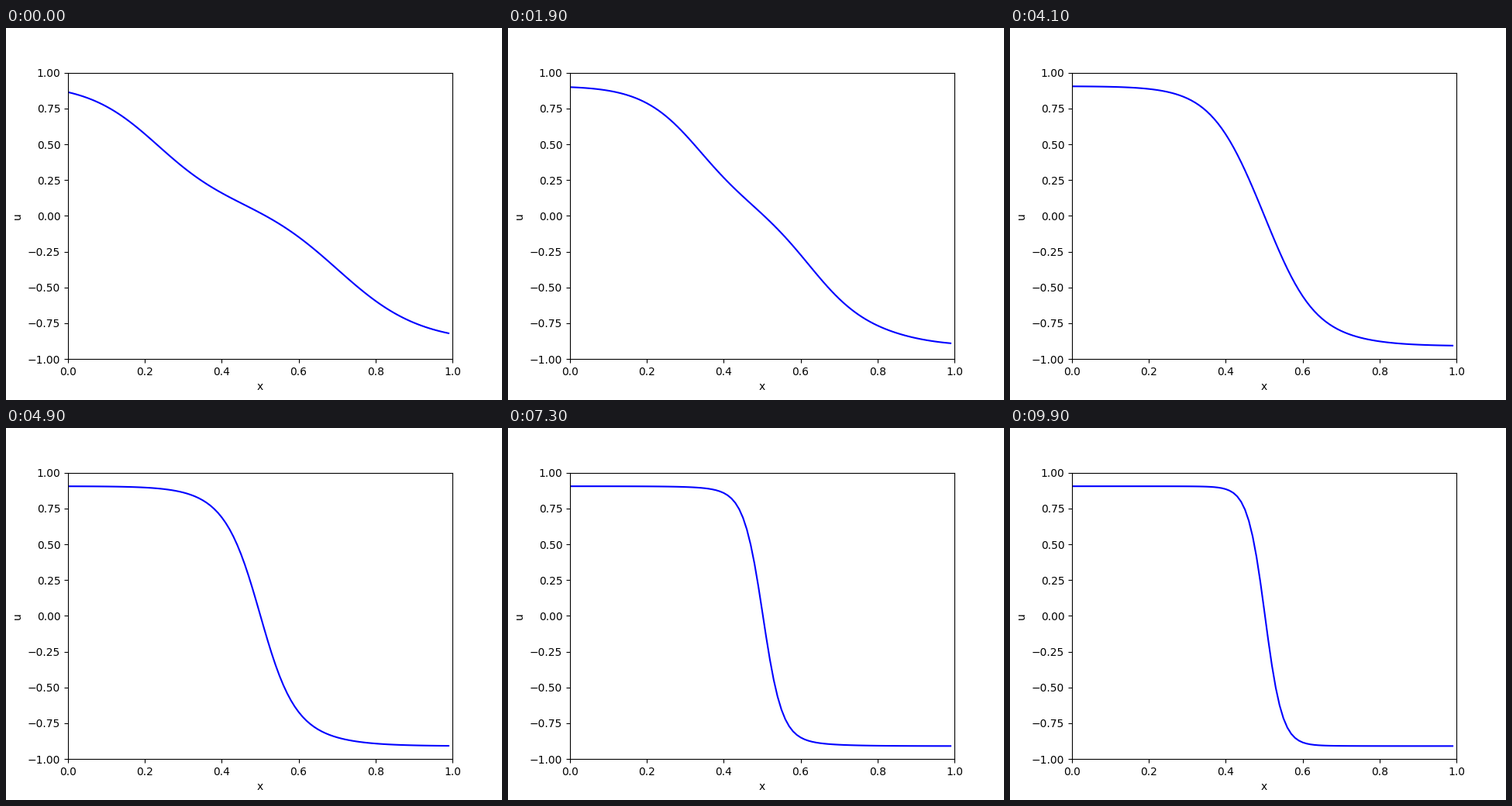
Recreate the animation shown at these times as a matplotlib script. Size 640x480 px, loop 10 s.

```python
import numpy as np
import matplotlib.pyplot as plt
from matplotlib.animation import FuncAnimation

FRAMES = 100
INTERVAL = 100
VISCOSITY = 0.02
DT = 0.00025
SUBSTEPS = 40  # 0.01 time units per frame

grid = np.linspace(0, 1, 201)
dx = grid[1] - grid[0]


def front(height, steepness, centre):
    return -height * np.tanh(steepness * (grid - centre))


def settle(start, end, tau, t):
    return end + (start - end) * np.exp(-t / tau)


def solve_burgers(start):
    """Viscous Burgers flow: two fronts merge into one standing shock."""
    u = start.copy()
    waves = [u.copy()]
    for step in range(1, (FRAMES - 1) * SUBSTEPS + 1):
        t = step * DT
        flux = u ** 2 / 2
        advect = (flux[2:] - flux[:-2]) / (2 * dx)
        diffuse = VISCOSITY * (u[2:] - 2 * u[1:-1] + u[:-2]) / dx ** 2
        u[1:-1] += DT * (diffuse - advect)
        u[0] = settle(start[0], 0.905, 0.10, t)
        u[-1] = settle(start[-1], -0.909, 0.12, t)
        if step % SUBSTEPS == 0:
            waves.append(u.copy())
    return waves


start = 0.02 + front(0.407, 5.6, 0.228) + front(0.4966, 4.7, 0.705)
waves = [u[:-1:2] for u in solve_burgers(start)]
x = grid[:-1:2]

fig, ax = plt.subplots(figsize=(6.4, 4.8), dpi=100)
ax.set(xlim=(0, 1), ylim=(-1, 1), xlabel="x", ylabel="u")
line, = ax.plot(x, waves[0], "b-")


def update(i):
    line.set_ydata(waves[i])
    return line,


anim = FuncAnimation(fig, update, frames=FRAMES, interval=INTERVAL,
                     repeat=True, repeat_delay=0)
plt.show()
```
